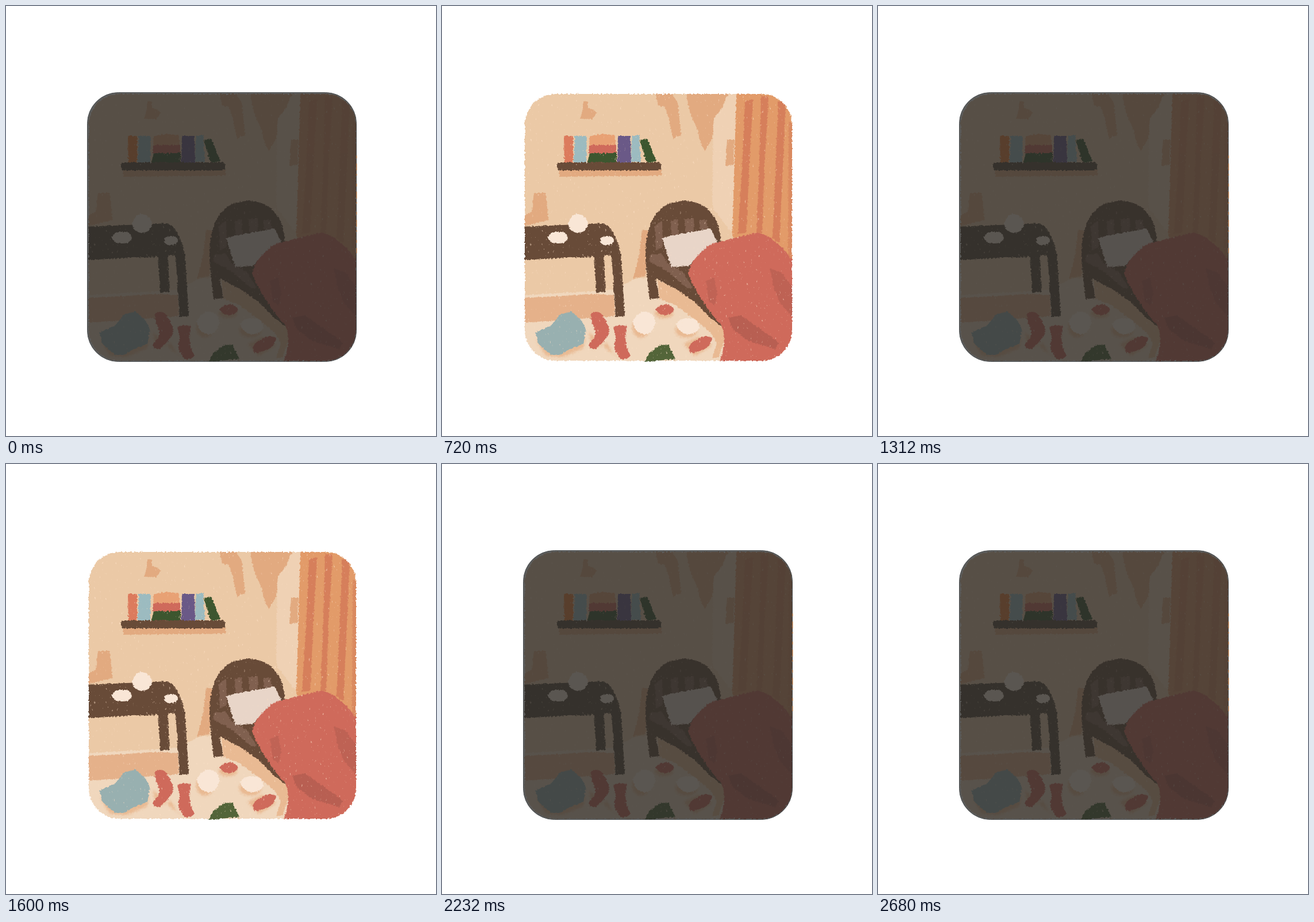
These frames come from a looping animation (748x748 px, 3400 ms). An HTML page:

```html
<!DOCTYPE html>
<html lang="en">
<head>
<meta charset="utf-8">
<title>Bedroom light</title>
<style>
  html, body { margin: 0; width: 100%; height: 100%; overflow: hidden; background: #fff; }
  svg { display: block; width: 100%; height: 100%; }
  .night { visibility: hidden; }
  .dark .night { visibility: visible; }
  .dark .book { fill: #ef8038; }
  .dark .desk { fill: #594a36; }
  .dark .stripe { opacity: .5; }
  .patch { fill: #e2aa80; }
  .wood { fill: #684b38; }
  .slat { fill: #80604f; }
  .red { fill: #cf6a5b; }
  .fold { fill: #b85f52; }
  .cream { fill: #f9e6d6; }
  .blue { fill: #9cbbc0; }
  .shade { fill: #e9ba93; }
</style>
</head>
<body>
<svg id="room" class="dark" viewBox="0 0 748 748">
  <defs>
    <clipPath id="card"><rect x="144" y="153" width="465" height="464" rx="54"/></clipPath>
    <filter id="crayon" filterUnits="userSpaceOnUse" x="130" y="140" width="490" height="490" color-interpolation-filters="sRGB">
      <feTurbulence type="fractalNoise" baseFrequency=".3" numOctaves="2" seed="4" result="wobble"/>
      <feDisplacementMap in="SourceGraphic" in2="wobble" scale="5" xChannelSelector="R" yChannelSelector="G" result="rough"/>
      <feGaussianBlur in="rough" stdDeviation=".5" result="drawn"/>
      <feTurbulence type="fractalNoise" baseFrequency=".3 .16" numOctaves="3" seed="9"/>
      <feColorMatrix values="0 0 0 0 1  0 0 0 0 .89  0 0 0 0 .79  0 0 0 4 -2.9"/>
      <feComposite in2="drawn" operator="in" result="specks"/>
      <feMerge><feMergeNode in="drawn"/><feMergeNode in="specks"/></feMerge>
    </filter>
    <filter id="soft"><feGaussianBlur stdDeviation="2"/></filter>
  </defs>

  <g filter="url(#crayon)">
    <g clip-path="url(#card)">
      <!-- wall and floor -->
      <path fill="#ebc9a6" d="M130 140H620V630H130Z"/>
      <path fill="#efd1b4" d="M498 153H515L508 400 470 350 472 195 486 178Z"/>
      <g class="patch">
        <path d="M246 166 253 165 255 177 270 185 261 197 240 196 244 184Z"/>
        <path d="M371 150H398L410 168 416 225 402 231 394 194 388 176 376 173Z"/>
        <path d="M424 150H500L484 182 473 195 470 230 457 253 450 238 444 214 432 188Z"/>
        <path d="M496 232H508L507 276 493 278Z"/>
        <path d="M160 325H181L185 372 140 384V366L156 358Z"/>
        <path d="M349 389 360 392 354 470 332 474 342 438Z"/>
      </g>
      <path fill="#f0d7bd" d="M140 503 265 496 300 494 334 475 362 472 500 560V630H140Z"/>
      <path fill="#e5b18a" d="M140 508 266 501 299 503 301 539 255 543 140 551Z"/>
      <path class="shade" d="M375 477 430 503 491 556 492 580 480 612H470L478 588 468 569 438 544 405 520 378 509Z"/>

      <!-- curtain -->
      <path fill="#e29b69" d="M512 150H620V450L505 402Z"/>
      <g class="stripe" fill="#d67f5b">
        <path d="M527 166 541 162 535 270 529 395 515 396 522 280Z"/>
        <path d="M555 156 568 158 561 280 557 395 547 394 552 270Z"/>
        <path d="M585 165 598 167 592 300 587 412 575 405 580 290Z"/>
        <path d="M603 200 611 205V445L602 432Z" opacity=".6"/>
      </g>

      <!-- shelf -->
      <path class="patch" d="M204 285H382V295L204 297Z"/>
      <path class="book" fill="#dc7b5d" d="M212 226H228V272H213Z"/>
      <path class="blue" d="M231 226H252L251 272H229Z"/>
      <path fill="#e8a174" d="M257 227Q280 219 301 226L302 244H256Z"/>
      <path class="red" d="M256 242H303V256H255Z"/>
      <path fill="#3d562f" d="M257 256H304V272H253Z"/>
      <path fill="#6a5987" d="M306 226H328L329 272H305Z"/>
      <path class="blue" d="M330 225H343L346 271H329Z"/>
      <path fill="#3d562f" d="M344 233 357 231 373 270 356 272Z"/>
      <rect class="wood desk" x="200" y="272" width="181" height="14" rx="5"/>

      <!-- table -->
      <path class="wood desk" d="M140 384 210 381 280 378Q298 382 311 430L318 539 302 541 295 434 282 433 284 497 268 499 265 436 215 438 140 442Z"/>
      <g class="cream">
        <path d="M184 403Q188 392 201 393 217 391 219 404 214 414 201 413 186 412 184 403Z"/>
        <path d="M219 380Q222 363 236 362 251 364 254 378 252 392 238 395 225 395 219 380Z"/>
        <ellipse cx="287" cy="408" rx="12" ry="8"/>
      </g>

      <!-- bed -->
      <path class="wood" d="M354 442C354 385 367 340 421 339 464 338 486 374 485 416L445 455 487 558 465 541 440 515 408 493 372 474 378 508 361 510Z"/>
      <g class="slat">
        <path d="M370 383 383 373 384 420 372 424Z"/>
        <path d="M397 374 410 371 411 397 400 399Z"/>
        <path d="M422 371 438 369 439 392 424 393Z"/>
        <path d="M448 372 460 372 463 388 449 389Z"/>
        <path d="M361 433 382 430 392 447 420 464 436 490 428 492 390 460 360 444Z"/>
      </g>
      <path fill="#e8d5c8" d="M383 404 400 399 468 387 479 412 455 424 430 452 399 454Z"/>
      <path class="red" d="M428 465C432 446 449 426 470 413L545 395C566 392 598 424 611 444V630H478C491 600 495 577 486 555 470 540 438 494 428 465Z"/>
      <g class="fold">
        <path d="M571 457 590 463 611 490V542L588 517 577 490Z" opacity=".75"/>
        <path d="M499 542 520 538 551 560 586 586 580 597 532 582 504 561Z"/>
        <path d="M459 478 473 473 479 500 474 522 464 513Z" opacity=".6"/>
      </g>

      <!-- things on the floor -->
      <g class="shade" filter="url(#soft)">
        <path d="M163 580 200 602 249 575 246 595 210 611 180 608Z"/>
        <path d="M255 566 262 597 287 586 299 607 318 617 290 600Z"/>
        <ellipse cx="346" cy="560" rx="15" ry="17"/>
        <ellipse cx="425" cy="564" rx="19" ry="13"/>
        <ellipse cx="386" cy="535" rx="16" ry="8"/>
        <path d="M420 588 446 575 470 590 440 609Z"/>
      </g>
      <path fill="#98b0b0" d="M162 568 191 555 205 537 225 531 242 546 250 562 247 587 218 599 204 607 190 607 168 588Z"/>
      <g class="red">
        <path d="M259 536Q266 529 276 534 289 550 291 564 290 579 266 597 258 597 255 589 268 575 267 566 259 550 259 536Z"/>
        <path d="M298 558Q308 553 321 557C318 577 318 588 328 608Q322 616 311 614C298 598 299 590 302 578Z"/>
        <path d="M371 528Q378 519 389 519 401 520 404 528 399 538 387 538 376 536 371 528Z"/>
        <path d="M429 594Q434 584 444 580 462 570 470 577 469 588 458 596 444 604 431 603Z"/>
      </g>
      <g class="cream">
        <path d="M332 550Q338 532 354 531 372 536 371 552 367 570 352 571 336 569 332 550Z"/>
        <path d="M407 553Q416 542 428 543 446 542 448 558 444 571 429 571 412 570 407 553Z"/>
      </g>
    </g>
    <path fill="#536539" d="M352 619 361 603 379 590 394 589 406 614 384 616Z"/>
  </g>

  <g class="night">
    <rect x="141.5" y="150.5" width="468" height="468" rx="54" fill="#2a2a29" fill-opacity=".765" stroke="#4b4f51"/>
    <path d="M610 260V430" stroke="#e08a48" stroke-dasharray="5 9 12 6 3 14" fill="none"/>
  </g>
</svg>
<script>
  const LOOP = 3400;
  const flashes = [[720, 880], [1600, 1800], [2520, 2680]];
  const room = document.getElementById('room');
  const start = performance.now();

  function draw(now) {
    const t = Math.max(0, now - start) % LOOP;
    const lit = flashes.some(([on, off]) => t >= on && t < off);
    room.classList.toggle('dark', !lit);
    requestAnimationFrame(draw);
  }
  requestAnimationFrame(draw);
</script>
</body>
</html>
```
